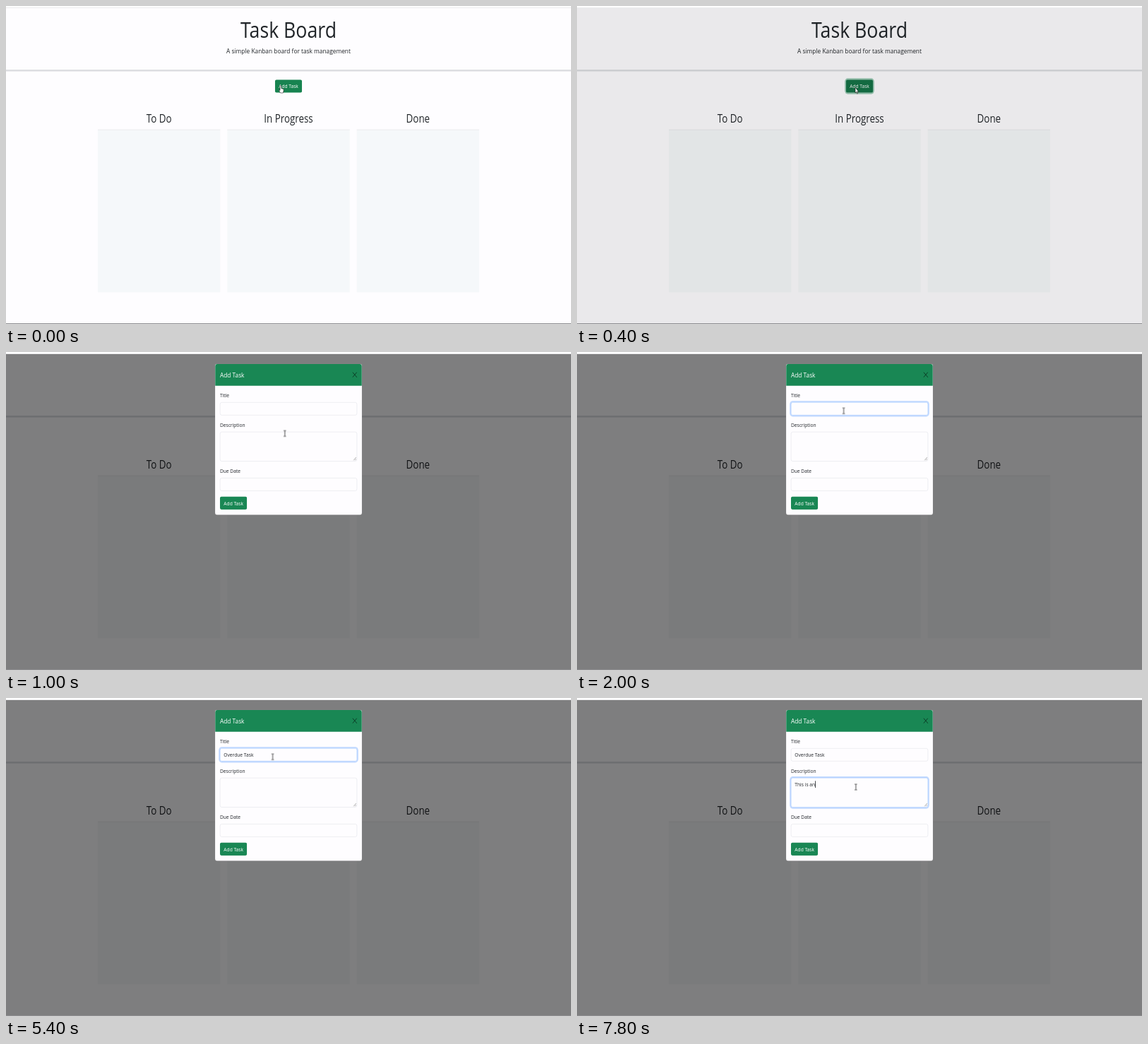
These frames come from a looping animation (800 by 450 pixels, 8000 ms). An HTML page:

```html
<!DOCTYPE html>
<html lang="en">
<head>
<meta charset="utf-8">
<title>Task Board</title>
<style>
* { box-sizing: border-box; margin: 0; padding: 0; }
html, body { width: 800px; height: 450px; overflow: hidden; background: #fff; }
body { position: relative; }

/* A 1920 x 919 page, shown in the 800 x 447 area below the top strip */
.page {
  position: absolute; left: 0; top: 3px; width: 1920px; height: 919px;
  overflow: hidden; background: #fefdff; color: #212529;
  font: 400 16px/1.5 "Open Sans", "Noto Sans", sans-serif;
  transform: scale(.416667, .4865); transform-origin: 0 0;
}
.strip { position: absolute; left: 0; width: 800px; height: 1px; }
.top { top: 2px; background: #ebebed; }
.bottom { top: 449px; background: #8c8c8f; }

header { height: 184px; padding: 24px; text-align: center; border-bottom: 5px solid #dcdde1; }
h1 { font: inherit; font-size: 64px; line-height: 76.8px; margin-bottom: 8px; }
.lead { font-size: 20px; }

.btn {
  display: block; height: 38px; padding: 6px 12px; border: 1px solid transparent;
  border-radius: 6px; background: #198754; color: #fff; width: max-content;
}
.open { margin: 24px auto 0; animation: press 8s step-end infinite; }

.column { position: absolute; top: 302px; width: 416px; height: 525px; text-align: center; }
.column h2 { font: inherit; font-size: 32px; line-height: 38.4px; height: 53px; border-bottom: 2px solid #e4e5e8; }
.column div { height: 472px; background: #f5f8fa; }

.backdrop { position: absolute; inset: 0; background: #000; animation: dim 8s step-end infinite; }

.modal {
  position: absolute; left: 710px; top: 28px; width: 500px; height: 440px;
  background: #fefdff; border: 1px solid rgba(0,0,0,.175); border-radius: 8px;
  animation: drop 8s step-end infinite;
}
.head {
  position: relative; height: 63px; padding: 16px; border-radius: 7px 7px 0 0;
  background: #198754; color: #fff; font-size: 20px; line-height: 30px;
}
.close { position: absolute; right: 16px; top: 23px; width: 16px; height: 16px; opacity: .6; }
.body { padding: 16px; }
.label { height: 32px; line-height: 24px; }
.field {
  position: relative; height: 38px; margin-bottom: 16px; padding: 6px 12px;
  border: 1px solid #d8dce1; border-radius: 6px; white-space: pre;
}
.area { height: 86px; }
.grip { position: absolute; right: 1px; bottom: 1px; width: 12px; height: 12px; }
#title { animation: focus-title 8s step-end infinite; }
#about { animation: focus-about 8s step-end infinite; }
.caret {
  display: inline-block; width: 2px; height: 20px; margin-right: -2px;
  vertical-align: -4px; background: #212529;
}

.pointer { position: absolute; left: 0; top: 0; overflow: visible; animation: move 8s step-end infinite; }
.hand { animation: hand 8s step-end infinite; }
.arrow { animation: arrow 8s step-end infinite; }
.beam { animation: beam 8s step-end infinite; }

@keyframes press {
  0% { background: #178350; }
  2.5% { background: #157347; }
  5%, 100% { background: #157347; box-shadow: 0 0 0 4px rgba(60,153,110,.5); }
}
@keyframes dim { 0% { opacity: 0; } 5% { opacity: .08; } 7.5%, 100% { opacity: .5; } }
@keyframes drop {
  0% { opacity: 0; transform: translateY(-50px); }
  7.5% { opacity: .55; transform: translateY(-30px); }
  10%, 100% { opacity: 1; transform: none; }
}
@keyframes focus-title {
  0% { border-color: #d8dce1; box-shadow: none; }
  22.5% { border-color: #86b7fe; box-shadow: 0 0 0 4px rgba(13,110,253,.25); }
  75%, 100% { border-color: #d8dce1; box-shadow: none; }
}
@keyframes focus-about {
  0% { border-color: #d8dce1; box-shadow: none; }
  75%, 100% { border-color: #86b7fe; box-shadow: 0 0 0 4px rgba(13,110,253,.25); }
}
@keyframes move {
  0% { transform: translate(389px, 113px); }
  2.5% { transform: translate(393px, 114px); }
  5% { transform: translate(394px, 115px); }
  7.5% { transform: translate(394.8px, 115.3px); }
  17.5% { transform: translate(389px, 105px); }
  20% { transform: translate(380px, 88px); }
  22.5% { transform: translate(377.6px, 83.2px); }
  70% { transform: translate(383px, 97px); }
  72.5%, 100% { transform: translate(394.8px, 126px); }
}
@keyframes hand { 0% { opacity: 1; } 5%, 100% { opacity: 0; } }
@keyframes arrow { 0% { opacity: 0; } 5% { opacity: 1; } 7.5%, 100% { opacity: 0; } }
@keyframes beam { 0% { opacity: 0; } 7.5%, 100% { opacity: 1; } }
</style>
</head>
<body>
<div class="page">
  <header>
    <h1>Task Board</h1>
    <p class="lead">A simple Kanban board for task management</p>
  </header>
  <div class="btn open">Add Task</div>
  <section class="column" style="left:312px"><h2>To Do</h2><div></div></section>
  <section class="column" style="left:752px"><h2>In Progress</h2><div></div></section>
  <section class="column" style="left:1192px"><h2>Done</h2><div></div></section>

  <div class="backdrop"></div>
  <div class="modal">
    <div class="head">Add Task
      <svg class="close" viewBox="0 0 16 16"><path d="M1 1 15 15M15 1 1 15" stroke="#000" stroke-width="2" stroke-linecap="round"/></svg>
    </div>
    <div class="body">
      <div class="label">Title</div>
      <div class="field" id="title"><span class="text"></span></div>
      <div class="label">Description</div>
      <div class="field area" id="about"><span class="text"></span><svg class="grip" viewBox="0 0 12 12"><path d="M2 11 11 2M7 11 11 7" stroke="#777" stroke-width="1.3"/></svg></div>
      <div class="label">Due Date</div>
      <div class="field"></div>
      <div class="btn">Add Task</div>
    </div>
  </div>
</div>
<div class="strip top"></div>
<div class="strip bottom"></div>

<svg class="pointer" width="1" height="1">
  <path class="hand" d="M-1 0Q0-1 .8 0V3.6L3.6 4.4Q4.4 4.7 4.2 6L3.5 10H-.4L-2.6 6.6Q-2.6 5.4-1 6.4Z" fill="#fff" stroke="#222" stroke-width=".6"/>
  <path class="arrow" d="M0 0V8L1.5 6.6 2.5 9.2 3.6 8.7 2.6 6.2H4.6Z" fill="#fff" stroke="#111" stroke-width=".6"/>
  <path class="beam" d="M-1.7-4H-.5L0-3.6 .5-4H1.7M0-3.6V3.6M-1.7 4H-.5L0 3.6 .5 4H1.7" fill="none" stroke="#222" stroke-width=".8"/>
</svg>

<script>
const LOOP = 8000;

// [time, typed text]; "|" marks a visible caret
const typing = {
  title: [
    [0, ""], [1800, "|"], [2000, ""], [2200, "|"], [2400, ""],
    [2600, "O|"], [2800, "Ov|"], [3000, "Over|"], [3200, "Overd|"],
    [3400, "Overdu|"], [3600, "Overdue |"], [4000, "Overdue T|"],
    [4600, "Overdue Ta|"], [4800, "Overdue Task|"], [5400, "Overdue Task"]
  ],
  about: [
    [0, ""], [6000, "|"], [6400, "Th|"], [6600, "Thi|"], [6800, "This |"],
    [7200, "This i|"], [7400, "This is|"], [7600, "This is a|"], [7800, "This is an|"]
  ]
};

const shown = {};

function show(id, value) {
  if (shown[id] === value) return;
  shown[id] = value;
  const box = document.querySelector(`#${id} .text`);
  box.textContent = value.replace("|", "");
  if (value.endsWith("|")) {
    const caret = document.createElement("span");
    caret.className = "caret";
    box.append(caret);
  }
}

let start;
function tick(now) {
  start ??= now;
  const t = (now - start) % LOOP;
  for (const id in typing) show(id, typing[id].findLast(([at]) => at <= t)[1]);
  requestAnimationFrame(tick);
}
requestAnimationFrame(tick);
</script>
</body>
</html>
```
